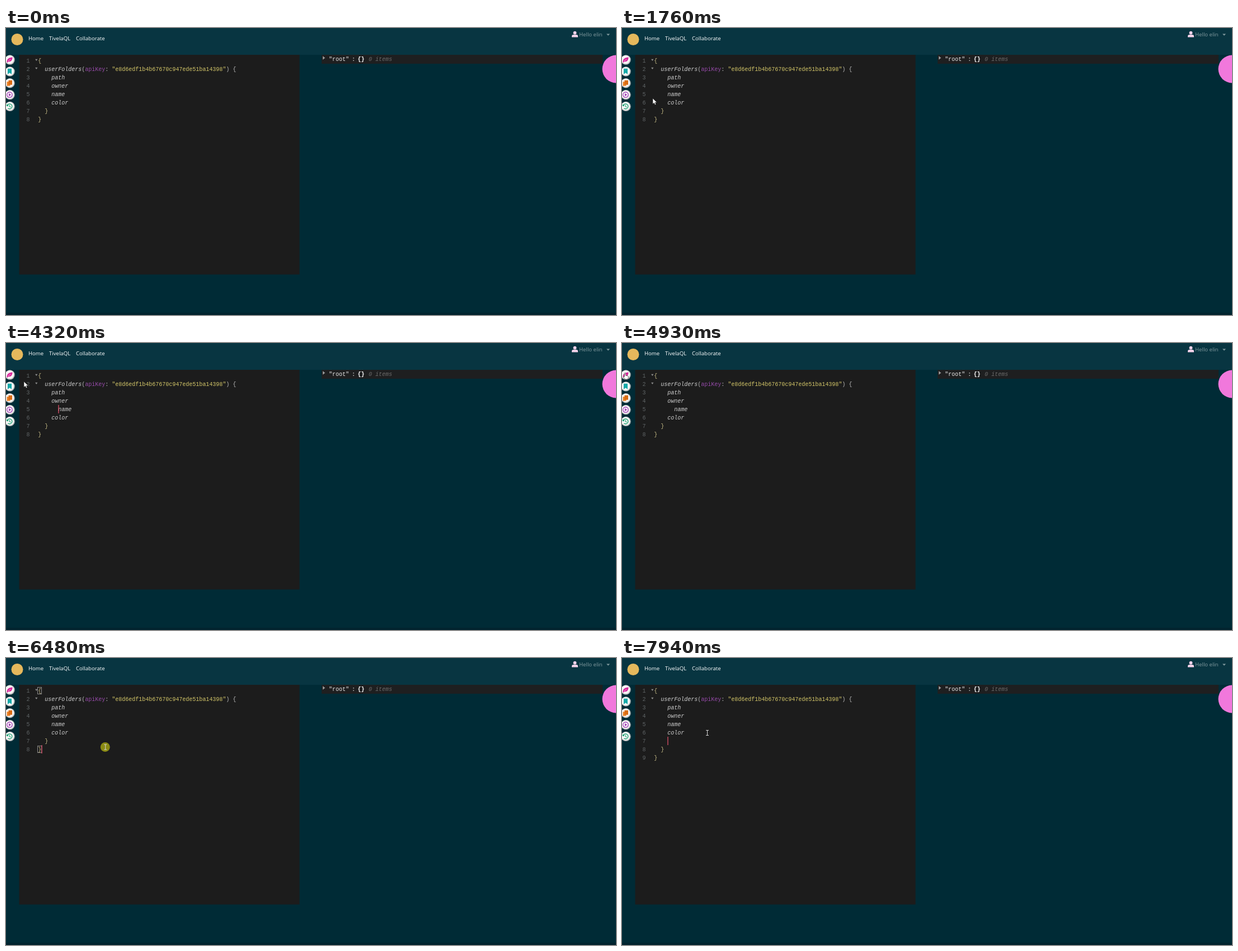
An HTML page with a canvas that plays this animation: 1090 by 514 pixels, repeating every 8000 ms.

```html
<!DOCTYPE html>
<html lang="en">
<head>
<meta charset="utf-8">
<title>Query editor</title>
<style>
html, body { margin: 0; width: 100%; height: 100%; overflow: hidden; background: #002b36; }
canvas { display: block; width: 1090px; height: 514px; }
</style>
</head>
<body>
<canvas id="stage" width="1090" height="514"></canvas>
<script>
const ctx = document.getElementById('stage').getContext('2d');
const LOOP = 8000, TICK = 76.5, BLINK = 530, PRESS = 80;
const MONO = '"Liberation Mono", monospace';
const SANS = '"Open Sans", "Noto Sans", sans-serif';
const ROW = 15, CHAR = 6;
const colX = col => 57.2 + col * CHAR;
const rowY = row => 58 + (row - 1) * ROW;

// Each stroke continues from where the previous one stopped.
const entry = { x: 1275, y: 560 };
const strokes = [
  { start: 610, end: 840, x: 417, y: 460 },
  { start: 1070, end: 1220, x: 182, y: 286 },
  { start: 1450, end: 1760, x: 55, y: 126 },
  { start: 1840, end: 2220, x: 101, y: 122, via: { x: 35, y: 116 } },
  { start: 2300, end: 2530, x: 84, y: 121 },
  { start: 4170, end: 4700, x: 6, y: 54, via: { x: 64, y: 84 } },
  { start: 4930, end: 5160, x: 5, y: 54 },
  { start: 6170, end: 6560, x: 178, y: 160 },
  { start: 6790, end: 7250, x: 152, y: 134 }
];

// What the user does to the document; the caret restarts its blink each time.
const edits = [
  { at: 0 },
  { at: 2680, press: true, col: 4, row: 5 },
  { at: 3540, typing: true, col: 5, row: 5, indent: 1 },
  { at: 4000, typing: true, col: 6, row: 5, indent: 2 },
  { at: 5560, press: true, indent: 2 },
  { at: 5710, match: true },
  { at: 6480, press: true, match: true, col: 1, row: 8 },
  { at: 7180, press: true, col: 9, row: 6 },
  { at: 7940, col: 4, row: 7, newLine: true }
];

const during = (t, from, to) => t >= from && t < to;
const easeOut = p => 1 - (1 - p) ** 3;
const mix = (a, b, p) => a + (b - a) * p;

function along(from, to, p) {
  const via = to.via || { x: (from.x + to.x) / 2, y: (from.y + to.y) / 2 };
  const axis = k => mix(mix(from[k], via[k], p), mix(via[k], to[k], p), p);
  return { x: axis('x'), y: axis('y') };
}

function pointerAt(t) {
  let pos = entry;
  for (const stroke of strokes) {
    if (t < stroke.start) break;
    const gaps = Math.round((stroke.end - stroke.start) / TICK);
    const pace = (stroke.end - stroke.start) / gaps;
    const step = Math.min(gaps, Math.floor((t - stroke.start + 5) / pace));
    pos = along(pos, stroke, easeOut((step + 1) / (gaps + 1)));
  }
  return pos;
}

function rect(x, y, w, h, color) {
  ctx.fillStyle = color;
  ctx.fillRect(x, y, w, h);
}

function disc(x, y, r, color) {
  ctx.fillStyle = color;
  ctx.beginPath();
  ctx.arc(x, y, r, 0, Math.PI * 2);
  ctx.fill();
}

function ring(r, color, width, from = 0, to = Math.PI * 2) {
  ctx.strokeStyle = color;
  ctx.lineWidth = width;
  ctx.beginPath();
  ctx.arc(0, 0, r, from, to);
  ctx.stroke();
}

function shape(d, fill, stroke, width = 1) {
  const path = new Path2D(d);
  if (fill) { ctx.fillStyle = fill; ctx.fill(path); }
  if (stroke) { ctx.strokeStyle = stroke; ctx.lineWidth = width; ctx.stroke(path); }
}

function at(x, y, draw) {
  ctx.save();
  ctx.translate(x, y);
  draw();
  ctx.restore();
}

function text(str, x, y, color, font, align = 'left') {
  ctx.font = font;
  ctx.fillStyle = color;
  ctx.textAlign = align;
  ctx.fillText(str, x, y);
}

function code(str, col, row, color, style = '') {
  text(str, colX(col), rowY(row) + 4, color, `${style} 10px ${MONO}`);
}

function drawHeader() {
  rect(0, 0, 1090, 48, '#083541');
  disc(20, 20.5, 10.5, '#e5b85c');
  const nav = `9.6px ${SANS}`;
  text('Home', 40, 22, '#fff', nav);
  text('TivelaQL', 77, 22, '#fff', nav);
  text('Collaborate', 125, 22, '#fff', nav);
  disc(1016.5, 8.7, 2.9, '#f6d3ea');
  shape('M1011 16.5v-2q0-2.5 2.7-2.5h5.6q2.7 0 2.7 2.5v2z', '#f6d3ea');
  text('Hello elin', 1024, 15, '#829a9f', nav);
  shape('M1073 10.5h6l-3 3.2z', '#829a9f');
}

const icons = [
  function leaf() {
    shape('M-5 4C-5-2-1-4 5-4.5C5 1 2 4-2 3L-4 5z', '#d8259b');
    shape('M-3 2L2-1', null, '#fff', .6);
  },
  function bookmark() {
    shape('M-3.5-5h7v10L0 2.3L-3.5 5z', '#13a8a8');
  },
  function copy() {
    rect(-5, -2.5, 6, 7.5, '#ed8428');
    rect(-2, -5, 6.5, 8, '#d96c13');
  },
  function play() {
    ring(4.8, '#a33bb8', 1.3);
    shape('M-1.5-2.6L2.7 0L-1.5 2.6z', '#a33bb8');
  },
  function history() {
    ring(4.4, '#21a477', 1.4, -2.7, 2.3);
    shape('M0-2.5V.3L2 1.7', null, '#21a477', 1.2);
    shape('M-5.5-4.5v4h4z', '#21a477');
  }
];

function drawIcons() {
  icons.forEach((draw, i) => {
    const y = 57 + i * 20.85;
    disc(7, y, 8.7, '#b9bcbc');
    disc(6.6, y - .4, 7.5, '#f6f6f6');
    at(6.5, y, draw);
  });
}

function drawEditor(t, edit) {
  const field = '#cfcfcf', brace = '#c3b985', plain = '#b8b8b8';
  const extra = edit.newLine ? 1 : 0;
  rect(23.5, 48, 501, 393.5, '#1c1c1c');
  for (let row = 1; row <= 8 + extra; row++) {
    text(row, 42.5, rowY(row) + 4, '#5f6466', `10px ${MONO}`, 'right');
  }
  for (const row of [1, 2]) at(54.3, rowY(row) - 1, () => shape('M-2.2-1.3h4.4L0 2z', '#8c8c8c'));

  code('{', 0, 1, brace);
  code('userFolders', 2, 2, field, 'italic');
  code('(', 13, 2, plain);
  code('apiKey', 14, 2, '#964aa9');
  code(':', 20, 2, plain);
  code('"e8d6edf1b4b67670c947ede51ba14398"', 22, 2, '#d2c568');
  code(') {', 56, 2, plain);
  ['path', 'owner', 'name', 'color'].forEach((name, i) => {
    const shift = name === 'name' ? edit.indent || 0 : 0;
    code(name, 4 + shift, 3 + i, field, 'italic');
  });
  code('}', 2, 7 + extra, brace);
  code('}', 0, 8 + extra, brace);

  if (edit.match) {
    ctx.strokeStyle = '#8a8a8a';
    ctx.lineWidth = 1;
    for (const row of [1, 8]) ctx.strokeRect(56.5, rowY(row) - 5.5, 7, 12);
  }
  const lit = (t - edit.at) % (2 * BLINK) < BLINK;
  if (edit.row && lit) rect(colX(edit.col) + .1, rowY(edit.row) - 7, 1.3, ROW, '#dc4f68');
}

function drawResult() {
  rect(564, 48, 502, 16, '#1e1f20');
  shape('M566 50.3l4.2 3.2l-4.2 3.2z', '#9a9a9a');
  const font = `10px ${MONO}`;
  text('"root"', 577, 59, '#ececec', font);
  text(':', 618, 59, '#ececec', font);
  text('{}', 628.5, 59, '#fff', `bold ${font}`);
  text('0 items', 648, 59, '#6c6c6c', `italic ${font}`);
  disc(1090.5, 73.5, 25, '#f178dc');
}

function drawTooltip() {
  rect(23, 43, 60, 26, '#222');
  text('Prettify', 38, 60.5, '#fff', `8.9px ${SANS}`);
}

const arrow = () =>
  shape('M0 0V10.2L2.4 8L4 11.5L5.7 10.8L4.2 7.3H7.3z', '#fff', '#222', .6);
const beam = () =>
  shape('M-2.5-4.5H2.5M0-4.5V4.5M-2.5 4.5H2.5', null, '#d4d4d4', 1);
const hand = () =>
  shape('M-1 0Q0-1 1 0V4L5 5Q6 5 6 7L5 11H0L-3 7Q-3 5-1 6.5z', '#fff', '#333', .7);

function drawPointer(t, edit) {
  // Typing hides the pointer until it moves again.
  if (edit.typing && t < 4170) return;
  const { x, y } = pointerAt(t);
  if (edit.press && t - edit.at < PRESS) disc(x, y, 8.5, 'rgba(200,200,16,.65)');
  const inText = x >= 57 && x < 524 && y > 48 && y < 441;
  const onButton = x < 15 && y > 48 && y < 66;
  if (inText) at(x + .5, y, beam);
  else at(x, y, onButton ? hand : arrow);
}

function drawScene(t) {
  const edit = edits.findLast(e => t >= e.at);
  rect(0, 0, 1090, 514, '#002b36');
  rect(0, 510, 1090, 4, '#02232e');
  drawHeader();
  drawEditor(t, edit);
  drawIcons();
  drawResult();
  if (during(t, 5560, 6170)) drawTooltip();
  drawPointer(t, edit);
}

let began;
function tick(now) {
  began ??= now;
  drawScene((now - began) % LOOP);
  requestAnimationFrame(tick);
}
requestAnimationFrame(tick);
</script>
</body>
</html>
```
